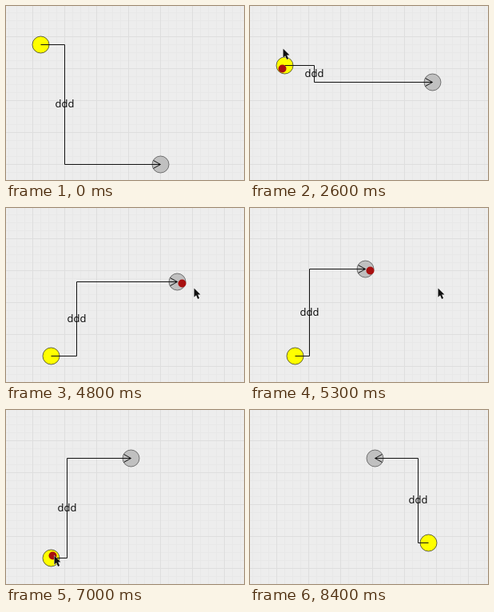
Recreate the animation shown at these times as an HTML page. Size 298 by 218 pixels, loop 8900 ms.

```html
<!DOCTYPE html>
<html lang="en">
<head>
<meta charset="utf-8">
<title>Connector drag</title>
<style>
  html, body { margin: 0; width: 100%; height: 100%; overflow: hidden; background: #ededed; }
  svg { display: block; width: 298px; height: 218px; }
  text { font: 13px "Open Sans", "DejaVu Sans", sans-serif; text-anchor: middle; }
</style>
</head>
<body>
<svg viewBox="0 0 298 218">
  <defs>
    <pattern id="grid" x="33" y="38" width="40" height="40" patternUnits="userSpaceOnUse">
      <path d="M10.5 0V40M20.5 0V40M30.5 0V40M0 10.5H40M0 20.5H40M0 30.5H40" stroke="#e8e8e8"/>
      <path d="M.5 0V40M0 .5H40" stroke="#dedede"/>
    </pattern>
  </defs>
  <rect width="298" height="218" fill="#ededed"/>
  <rect width="298" height="218" fill="url(#grid)"/>
  <g transform="translate(.5 .5)">
    <circle id="source" r="10.5" fill="#ff0" stroke="#222" stroke-width=".7"/>
    <circle id="sink" r="10.5" fill="#c0c0c0" stroke="#444" stroke-width=".7"/>
    <path id="wire" fill="none" stroke="#111"/>
    <text id="label">ddd</text>
    <circle id="dot" r="5" fill="#a81010"/>
    <path id="pointer" d="M0 0V11.2L2.6 8.8L4.6 13.4L6.6 12.5L4.6 8.1H8Z"
          fill="#111" stroke="#fff" stroke-width=".8" paint-order="stroke"/>
  </g>
</svg>
<script>
const LOOP = 8900;
const $ = id => document.getElementById(id);

// Spans in which the picture refreshes every 100 ms; it holds in between.
const spans = [[0, 0], [300, 300], [500, 600], [800, 800], [1000, 1100], [1300, 1800],
  [2000, 2000], [2200, 2200], [2400, 2400], [2600, 3100], [3300, 4000], [4500, 4500],
  [4800, 6800], [7000, 7000], [7200, 8000], [8200, 8200], [8400, 8400]];

// Keys are [time, x, y].
const sourceKeys = [[2500, 43, 48], [2600, 43, 74], [2900, 50, 145], [3100, 56, 185],
  [7100, 56, 185], [7300, 140, 172], [7500, 214, 162], [8000, 223, 166]];
const sinkKeys = [[900, 193, 198], [1100, 222, 118], [1300, 228, 95],
  [4700, 228, 95], [5300, 144, 76], [5700, 156, 60]];

// Pointer stays where a drag began; only the dot follows the node.
const pointerShows = [
  { from: 300, to: 1400, keys: [[300, 189, 203], [600, 197, 202]] },
  { from: 1400, to: 3300, keys: [[1400, 190, 88], [1800, 41, 53]] },
  { from: 3300, to: 5800, keys: [[3300, 60, 187], [3600, 221, 128], [4000, 235, 100]] },
  { from: 6300, to: 8400, keys: [[6300, 156, 62], [6800, 60, 182]] }
];
const drags = [
  { from: 800, to: 1400, keys: sinkKeys, dx: 4, dy: 3 },
  { from: 2400, to: 3300, keys: sourceKeys, dx: -3, dy: 4 },
  { from: 4500, to: 5800, keys: sinkKeys, dx: 6, dy: 2 },
  { from: 7000, to: 8200, keys: sourceKeys, dx: 2, dy: -3 }
];

function sample(keys, t) {
  const next = keys.findIndex(key => key[0] > t);
  if (next === 0) return keys[0].slice(1);
  if (next < 0) return keys[keys.length - 1].slice(1);
  const [t0, x0, y0] = keys[next - 1], [t1, x1, y1] = keys[next];
  const k = (t - t0) / (t1 - t0);
  return [Math.round(x0 + (x1 - x0) * k), Math.round(y0 + (y1 - y0) * k)];
}

function refreshTime(t) {
  const [, end] = spans.filter(([start]) => start <= t).pop();
  return Math.min(end, Math.floor(t / 100) * 100);
}

const active = (list, t) => list.find(item => t >= item.from && t < item.to);
const place = (id, x, y) => $(id).setAttribute("transform", `translate(${x} ${y})`);
const show = (id, on) => $(id).setAttribute("visibility", on ? "visible" : "hidden");

function draw(time) {
  const t = refreshTime(time % LOOP);
  const [sx, sy] = sample(sourceKeys, t);
  const [ex, ey] = sample(sinkKeys, t);
  const bend = Math.round(sx + (ex - sx) * .2);
  const back = ex - 9 * Math.sign(ex - sx);

  place("source", sx, sy);
  place("sink", ex, ey);
  $("wire").setAttribute("d",
    `M${sx} ${sy}H${bend}V${ey}H${ex}M${back} ${ey - 5}L${ex} ${ey}L${back} ${ey + 5}`);
  place("label", bend, (sy + ey) / 2 + 3.5);

  const pointer = active(pointerShows, t);
  show("pointer", pointer);
  if (pointer) place("pointer", ...sample(pointer.keys, t));

  const drag = active(drags, t);
  show("dot", drag);
  if (drag) {
    const [x, y] = sample(drag.keys, t);
    place("dot", x + drag.dx, y + drag.dy);
  }
}

const began = performance.now();
function tick() {
  draw(performance.now() - began);
  requestAnimationFrame(tick);
}
tick();
</script>
</body>
</html>
```
